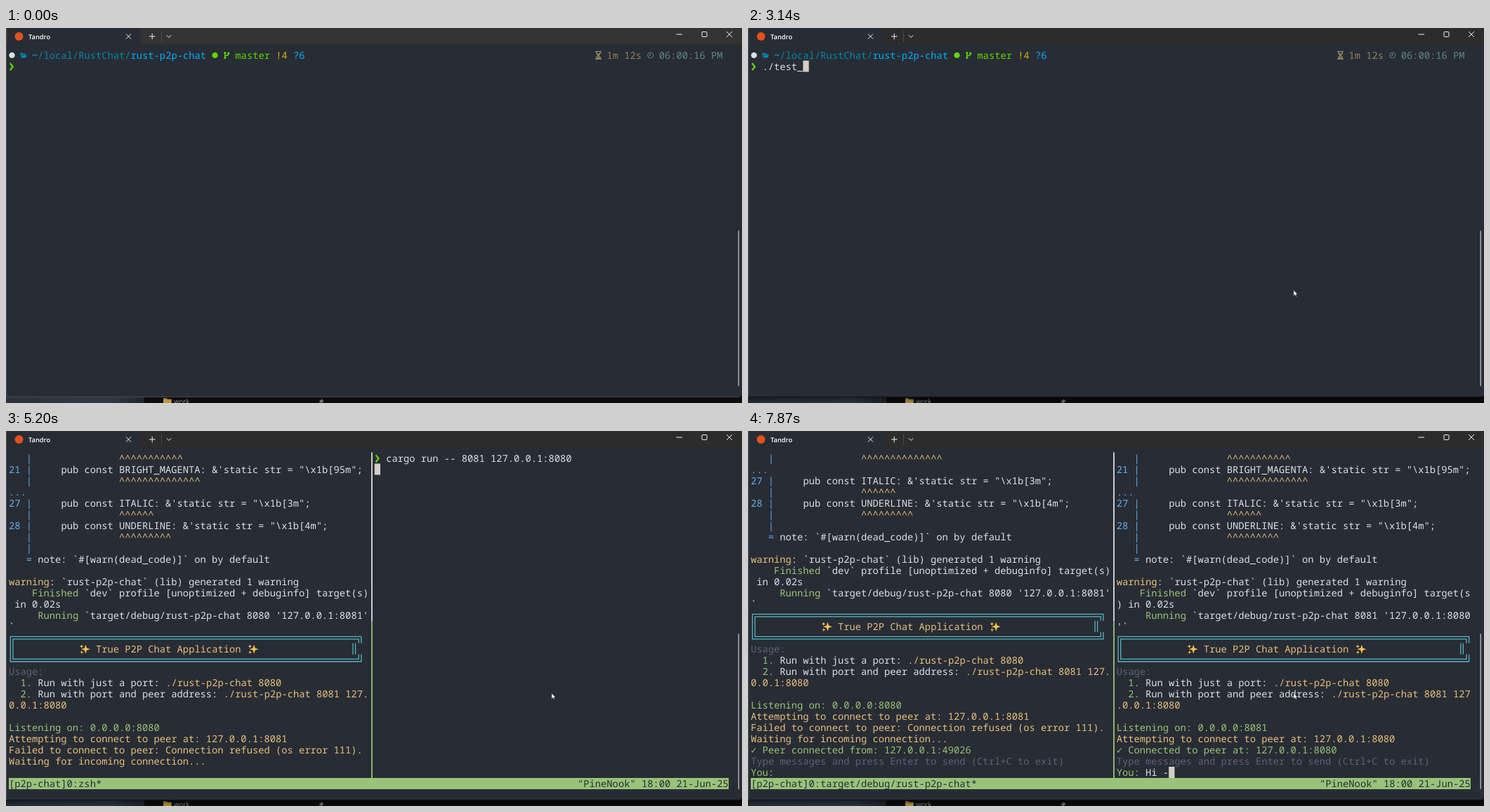
Write an HTML page that moves like this. It is 1048 px wide and 535 px high and loops after 8 s.

```html
<!DOCTYPE html>
<html lang="en">
<head>
<meta charset="utf-8">
<title>Terminal chat</title>
<style>
html, body { margin: 0; width: 100%; height: 100%; overflow: hidden; background: #282c34; }
svg { display: block; width: 100vw; height: 100vh; }
text { white-space: pre; text-rendering: geometricPrecision; font-variant-ligatures: none; }
.mono { font-family: "Noto Sans Mono", "DejaVu Sans Mono", monospace; font-size: 13.777px; font-weight: 500; }
.ui { font-family: "Open Sans", "Noto Sans", sans-serif; }
.line { fill: none; stroke: #f2f2f2; stroke-width: 1; }
</style>
</head>
<body>
<svg id="stage" viewBox="0 0 1048 535">
  <rect width="1048" height="535" fill="#0c0c0d"/>
  <defs>
    <linearGradient id="desk">
      <stop offset="0" stop-color="#2a323b"/>
      <stop offset=".75" stop-color="#303944"/>
      <stop offset="1" stop-color="#20262d"/>
    </linearGradient>
    <linearGradient id="fade" x2="0" y2="1">
      <stop offset="0" stop-color="#000" stop-opacity=".45"/>
      <stop offset="1" stop-color="#000" stop-opacity=".1"/>
    </linearGradient>
  </defs>

  <!-- strip below the window -->
  <rect y="526" width="197" height="9" fill="url(#desk)"/>
  <path d="M224 528h4.500l1.500 1.500h5.500V535H224z" fill="#a88638"/>
  <rect x="224" y="530.500" width="11.500" height="4.500" fill="#bd9a45"/>
  <text class="ui" x="239" y="536" font-size="9.600" fill="#929292">work</text>
  <path d="M449 529l4 3.500-2 .5-1.500 2.500-1.500-1.500-2.500 1.500 1.500-2.500-1-1.500 2.500-.5z" fill="#77797b"/>
  <rect id="shadow" y="526" width="1048" height="9" fill="url(#fade)"/>

  <!-- window -->
  <path d="M0 0H1048V522q0 4-4 4H0z" fill="#282c34"/>
  <path id="edge" d="M0 526.300H1044" stroke-width="1"/>
  <rect id="bar" width="1048" height="23.500"/>
  <path d="M0 23.500q3 0 3-3V6q0-6 6-6H186q6 0 6 6V20.500q0 3 3 3z" fill="#282c34"/>
  <path d="M.5 0V526" stroke="#4a4e56" stroke-width="1"/>
  <circle cx="18.500" cy="12" r="6" fill="#e2511f"/>
  <text class="ui" x="32" y="15.600" font-size="9.300" font-weight="600" fill="#fff">Tandro</text>
  <path class="line" d="M171 8.500l7 7m0-7l-7 7M204 12h8.500M208.200 7.800v8.500M228.800 10.300l3.200 3.200 3.200-3.200"/>
  <path d="M221.500 4V20" stroke="#4c4c4c"/>
  <path class="line" d="M954.500 9h8.500M1026 5l8 8m0-8l-8 8"/>
  <rect class="line" x="991" y="5.500" width="7" height="7" rx="1"/>
  <rect x="1042.400" y="289" width="1.700" height="222" rx=".8" fill="#a0a2a5"/>

  <g id="screen" class="mono"></g>
  <rect id="cursor" width="8.266" height="16" fill="#d3cec6"/>
  <path id="mouse" d="M0 0V8.600L2 6.800 3.300 9.600 4.700 9 3.400 6.300H6z" fill="#fff" stroke="#15171b" stroke-width=".7"/>
</svg>
<script>
const LOOP = 8000, CW = 8.266, LH = 16.017, LEFT = 4, TOP = 30.5;
const BASE = 13.4, MID = 8.4; // text baseline and middle within a row
const RIGHT = 63; // first column of the right pane
const INK = { w: '#dcdfe4', g: '#98c379', y: '#e5c07b', b: '#61afef', c: '#56b6c2', d: '#5a6374',
  k: '#282c34', n: '#0087af', s: '#00afff', l: '#5fd700', o: '#d7af00', h: '#87875f', t: '#5f8787' };
const $ = id => document.getElementById(id);
const colX = col => LEFT + col * CW;
const rowY = row => TOP + row * LH;

function add(parent, tag, attrs, text) {
  const el = document.createElementNS('http://www.w3.org/2000/svg', tag);
  for (const k in attrs) el.setAttribute(k, attrs[k]);
  if (text !== undefined) el.textContent = text;
  parent.appendChild(el);
  return el;
}
const group = () => add($('screen'), 'g', {});
const write = (g, col, row, text, ink = 'w') =>
  add(g, 'text', { x: colX(col), y: rowY(row) + BASE, fill: INK[ink] }, text);
const stroke = (g, d, color, width = 1.2) =>
  add(g, 'path', { d, fill: 'none', stroke: color, 'stroke-width': width });
const chevron = (g, col, row) =>
  stroke(g, `M${colX(col) + 1.8} ${rowY(row) + MID - 4.7}l4 5-4 5`, INK.l, 2.3);

// "§x" switches the ink; lines wrap at the pane width
function wrap(line, width) {
  const cells = [];
  let ink = 'w';
  for (let i = 0; i < line.length; i++) {
    if (line[i] === '§') ink = line[++i];
    else cells.push([line[i], ink]);
  }
  const rows = [];
  do rows.push(cells.splice(0, width)); while (cells.length);
  return rows;
}

function writeCells(g, col, row, cells) {
  for (let i = 0; i < cells.length;) {
    const from = i, ink = cells[i][1];
    let run = '';
    while (i < cells.length && cells[i][1] === ink) run += cells[i++][0];
    const lead = run.length - run.trimStart().length;
    if (run.trim()) write(g, col + from + lead, row, run.trim(), ink);
  }
}

function star(g, x, y, r) {
  const q = r * 0.24;
  add(g, 'path', { fill: '#f8c650', d: `M${x} ${y - r}L${x + q} ${y - q} ${x + r} ${y} ${x + q} ${y + q} ` +
    `${x} ${y + r} ${x - q} ${y + q} ${x - r} ${y} ${x - q} ${y - q}z` });
}

function banner(g, col, row) {
  const l = colX(col + 0.5), r = colX(col + 60.5), bar = colX(col + 59.5);
  const y = rowY(row) + MID, in1 = rowY(row + 1), in2 = rowY(row + 2);
  for (const d of [1.8, -1.8]) {
    stroke(g, `M${r + d} ${in1}V${y - d}H${l - d}V${y + 2 * LH + d}H${r + d}V${in2}`, INK.c, 1.3);
    stroke(g, `M${bar + d} ${in1}V${in2}`, INK.c, 1.3);
  }
  for (const c of [13.1, 42.1]) {
    const x = colX(col + c), m = in1 + MID;
    star(g, x + 1.2, m, 6.5);
    star(g, x - 4.6, m - 4, 3);
    star(g, x - 4.4, m + 4.5, 2.8);
  }
}

const carets = n => '§b   |               §y' + '^'.repeat(n);
const constant = (num, name, code) =>
  [`§b${num} |§w     pub const ${name}: &'static str = "\\x1b[${code}";`, carets(name.length)];

function session(port, peer, width, tail) {
  return [
    carets(11),
    ...constant(21, 'BRIGHT_MAGENTA', '95m'),
    '§b...',
    ...constant(27, 'ITALIC', '3m'),
    ...constant(28, 'UNDERLINE', '4m'),
    '§b   |',
    '§b   =§w note: `#[warn(dead_code)]` on by default',
    '',
    '§ywarning§w: `rust-p2p-chat` (lib) generated 1 warning',
    '§g    Finished§w `dev` profile [unoptimized + debuginfo] target(s) in 0.02s',
    `§g     Running§w \`target/debug/rust-p2p-chat ${port} '127.0.0.1:${peer}'\``,
    '§c=',
    '§y               True P2P Chat Application',
    '',
    '§dUsage:',
    '§g  1.§w Run with just a port: §y./rust-p2p-chat 8080',
    '§g  2.§w Run with port and peer address: §y./rust-p2p-chat 8081 127.0.0.1:8080',
    '',
    `§gListening on: 0.0.0.0:${port}`,
    `§yAttempting to connect to peer at: 127.0.0.1:${peer}`,
    ...tail,
    '§dType messages and press Enter to send (Ctrl+C to exit)',
    '§gYou:'
  ].flatMap(line => wrap(line, width));
}

function pane(col, rows) {
  const g = group();
  rows.forEach((cells, row) => {
    if (cells.length === 1 && cells[0][0] === '=') banner(g, col, row);
    else writeCells(g, col, row, cells);
  });
  return g;
}

function buildPrompt() {
  const g = group(), y = rowY(0) + MID;
  add(g, 'circle', { cx: 8.5, cy: y, r: 4.2, fill: INK.w });
  add(g, 'path', { d: `M20.5 ${y - 3.5}h3.2l1 1.2h3.3v1.3h-5.3l-2.2 3zM23 ${y - 0.4}h7l-1.8 3.9h-7z`, fill: INK.n });
  writeCells(g, 4, 0, wrap('§s~§n/local/RustChat/§srust-p2p-chat', 99)[0]);
  add(g, 'circle', { cx: 297.5, cy: y, r: 4.2, fill: INK.l });
  stroke(g, `M311.8 ${y - 3}v6.5M316.8 ${y - 2.5}q0 3-5 3.4`, INK.l, 1.5);
  for (const [x, dy] of [[311.8, -3.4], [316.8, -2.7], [311.8, 3.6]])
    add(g, 'circle', { cx: x, cy: y + dy, r: 1.6, fill: INK.l });
  write(g, 39, 0, 'master', 'l');
  write(g, 46, 0, '!4', 'o');
  write(g, 49, 0, '?6', 's');
  stroke(g, `M839 ${y - 5.3}h9M839 ${y + 5.3}h9M840.5 ${y - 5}q0 3 3 5q-3 2-3 5M846.5 ${y - 5}q0 3-3 5q3 2 3 5`, INK.h, 1.4);
  add(g, 'path', { d: `M841 ${y + 5}q.5-2.5 2.5-3.2q2 .7 2.5 3.2zM841.5 ${y - 2.5}h4l-2 2.5z`, fill: INK.h });
  write(g, 103, 0, '1m 12s', 'h');
  add(g, 'circle', { cx: 917.6, cy: y, r: 4, fill: 'none', stroke: INK.t });
  stroke(g, `M917.6 ${y - 2.5}V${y + 0.3}H915.5`, INK.t, 1);
  write(g, 112, 0, '06:00:16 PM', 't');
  chevron(g, 0, 1);
  return g;
}

function buildFrame() {
  const g = group();
  stroke(g, `M521 ${TOP}V271`, INK.w, 1.8);
  stroke(g, 'M521 271V495', INK.g, 1.8);
  add(g, 'rect', { x: LEFT, y: rowY(29), width: 124 * CW, height: LH, fill: INK.g });
  write(g, 98, 29, '"PineNook" 18:00 21-Jun-25', 'k');
  return g;
}

const prompt = buildPrompt();
const launched = group();
chevron(launched, 0, 0);
const typed = write($('screen'), 2, 1, '');

const frame = buildFrame();
const tabName = write(frame, 0, 29, '', 'k');
const leftRows = session(8080, 8081, 62, [
  '§yFailed to connect to peer: Connection refused (os error 111).',
  '§yWaiting for incoming connection...',
  '§g✓§w §gPeer connected from: 127.0.0.1:49026'
]);
const waiting = pane(0, leftRows.slice(0, 28));
const joined = pane(0, leftRows.slice(2));
const starting = group();
chevron(starting, RIGHT, 0);
write(starting, RIGHT + 2, 0, 'cargo run -- 8081 127.0.0.1:8080');
const peer = pane(RIGHT, session(8081, 8080, 61, ['§g✓§w §gConnected to peer at: 127.0.0.1:8080']));

const COMMAND = './test_tmux.sh ', MESSAGE = 'Hi -';
// [time, characters typed so far]
const commandKeys = [[2150, 1], [2270, 2], [2480, 3], [2610, 5], [2740, 6], [3140, 7], [3410, 8], [3610, 15]];
const messageKeys = [[7200, 1], [7400, 2], [7670, 3], [7870, 4]];
const countAt = (keys, t) => keys.reduce((n, [at, count]) => t >= at ? count : n, 0);

const show = (el, on) => el.setAttribute('display', on ? 'inline' : 'none');
function place(el, col, row, dy = 0) {
  el.setAttribute('x', colX(col));
  el.setAttribute('y', rowY(row) + dy);
}

function draw(t) {
  const focus = t >= 260, run = t >= 4210, tmux = t >= 5200, chat = t >= 5270;
  $('bar').setAttribute('fill', focus ? '#2c2c2c' : '#333333');
  $('edge').setAttribute('stroke', focus ? '#15171a' : '#4b4e53');
  show($('shadow'), focus);
  show(prompt, !run);
  show(launched, run && !tmux);
  show(frame, tmux);
  show(waiting, tmux && !chat);
  show(starting, tmux && !chat);
  show(joined, chat);
  show(peer, chat);

  const keys = countAt(commandKeys, t), chars = countAt(messageKeys, t);
  const col = chat ? RIGHT + 5 : 2, row = chat ? 28 : run ? 0 : 1;
  typed.textContent = chat ? MESSAGE.slice(0, chars) : tmux ? '' : COMMAND.slice(0, keys);
  place(typed, col, row, BASE);
  tabName.textContent = '[p2p-chat]0:' + (t >= 7200 ? 'target/debug/rust-p2p-chat*' : 'zsh*');

  show($('cursor'), focus);
  if (chat) place($('cursor'), col + chars, 28);
  else if (run) place($('cursor'), tmux ? RIGHT : 0, 1);
  else place($('cursor'), 2 + keys, 1);

  // the pointer glides in from below in steps of 80 ms
  const p = Math.min(1, (Math.floor((t - 260) / 80) + 1) / 7), left = (1 - p) ** 2;
  show($('mouse'), focus);
  $('mouse').setAttribute('transform', `translate(${776.8 + 150 * left} ${373.8 + 170 * left})`);
}

const start = performance.now();
function tick() {
  draw((performance.now() - start) % LOOP);
  requestAnimationFrame(tick);
}
draw(0);
requestAnimationFrame(tick);
</script>
</body>
</html>
```
